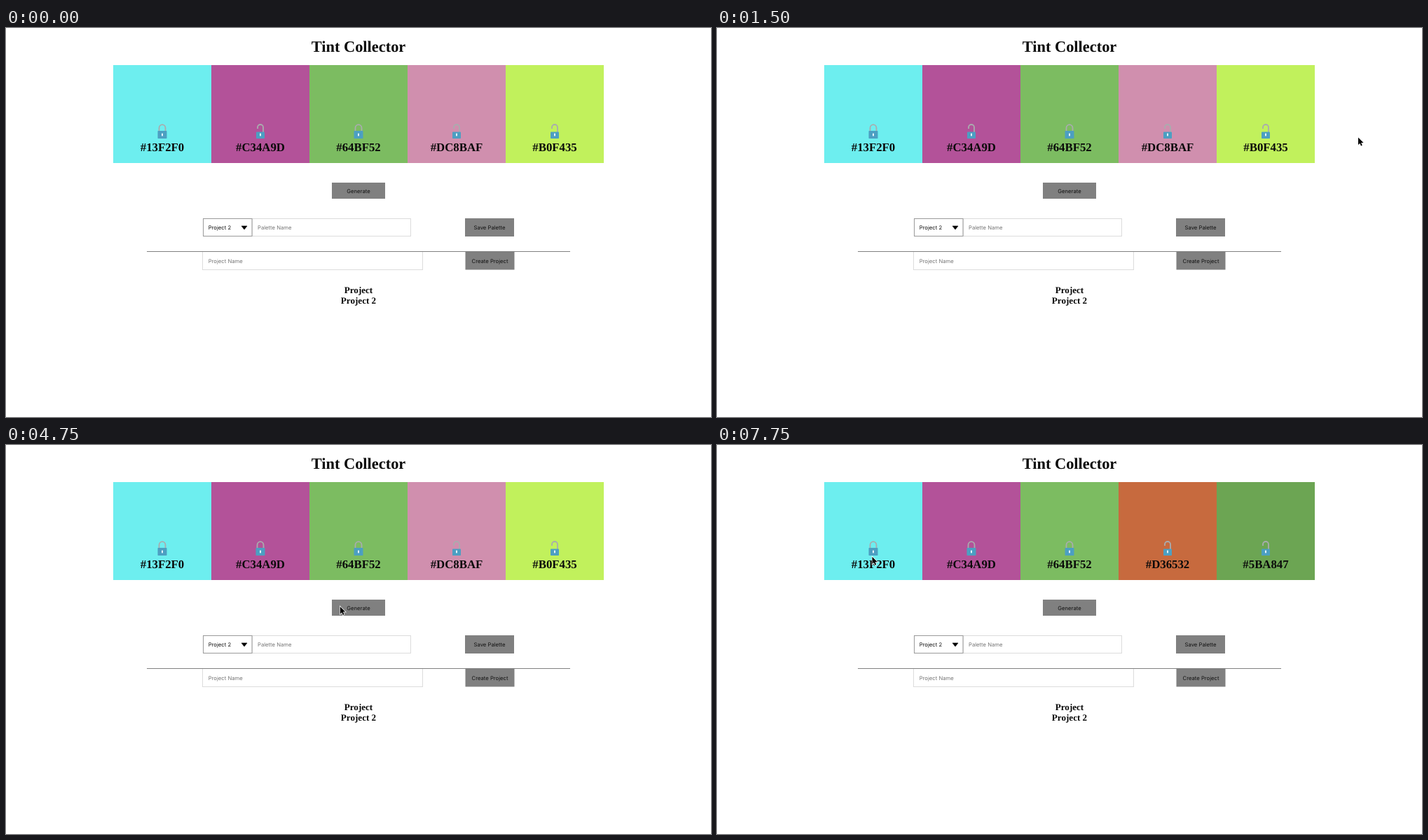
Write an HTML page that moves like this. It is 1006 by 556 pixels and loops after 8 s.

```html
<!DOCTYPE html>
<html lang="en">
<head>
<meta charset="utf-8">
<title>Tint Collector</title>
<style>
  html, body { margin: 0; width: 100%; height: 100%; overflow: hidden; background: #fff; }
  svg { display: block; }
  text { font: 7.7px Inter, "Open Sans", sans-serif; fill: #111; text-rendering: geometricPrecision; }
  .mid { text-anchor: middle; }
  .serif { font-family: "Liberation Serif", "Noto Serif", serif; font-weight: bold; fill: #0a0a0a; }
  .title { font-size: 22.4px; }
  .code { font-size: 16.8px; }
  .item { font-size: 13.1px; }
  .hint { fill: #757575; }
  .button { fill: #808080; }
  .field { fill: #fff; stroke: #dcdcdc; }
  .ring { fill: none; stroke: #619cf0; }
  .shackle { fill: none; stroke: #a9acae; stroke-width: 1.8; }
  .body { fill: #4c9fc2; }
  .keyhole { fill: #e8f6fc; }
</style>
</head>
<body>
<svg width="1006" height="556" viewBox="0 0 1006 556">
  <text class="serif title mid" x="503" y="33.5">Tint Collector</text>
  <g id="swatches"></g>

  <g id="focus">
    <rect class="ring" x="463.8" y="219.8" width="78.4" height="25.4" rx="1.5" stroke-width="3.6" opacity=".5"/>
    <rect class="ring" x="463.8" y="219.8" width="78.4" height="25.4" rx="1" stroke-width="2.2"/>
  </g>
  <rect class="button" x="465" y="221" width="76" height="23"/>
  <text class="mid" x="503" y="235.8">Generate</text>

  <rect class="field" x="351.5" y="272.5" width="226" height="25"/>
  <rect x="281.5" y="272.5" width="69.5" height="25" fill="#fff" stroke="#9a9a9a"/>
  <text x="288.7" y="288.2">Project 2</text>
  <path d="M336 283h8l-4 5z" stroke="#000" stroke-width=".6" stroke-linejoin="round"/>
  <text class="hint" x="359" y="288.2">Palette Name</text>
  <rect class="button" x="655" y="272" width="70" height="26"/>
  <text class="mid" x="690" y="288.2">Save Palette</text>

  <rect class="field" x="280.5" y="319.5" width="314" height="26"/>
  <text class="hint" x="288.7" y="335.8">Project Name</text>
  <rect class="button" x="655.5" y="319.5" width="70" height="26"/>
  <text class="mid" x="690.5" y="335.8">Create Project</text>
  <path d="M201 319.5H805" stroke="#808080"/>

  <text class="serif item mid" x="503" y="378.5">Project</text>
  <text class="serif item mid" x="503" y="394">Project 2</text>

  <g id="panel">
    <rect width="26" height="556" fill="#888"/>
    <path d="M9.2 268.5h10.6v20l-5.3-5-5.3 5z" fill="none" stroke="#fff" stroke-width="1.8"/>
  </g>
  <path id="cursor" d="M0 0V10.4L2.4 8.2 4 12 5.7 11.2 4.2 7.5H7.5Z" fill="#000"
        stroke="#fff" stroke-width="1.4" paint-order="stroke"/>
</svg>
<script>
const LOOP = 8000, TICK = 250;
const $ = id => document.getElementById(id);
const easeOut = p => 1 - (1 - Math.min(Math.max(p, 0), 1)) ** 3;

// The pointer glides to each stop and rests there until the next one.
const glides = [
  { at: 0, for: 250, x: 1002, y: 170.5 },
  { at: 500, for: 250, x: 924, y: 157 },
  { at: 1250, for: 250, x: 915, y: 156.5 },
  { at: 1500, for: 750, x: 289.5, y: 160 },
  { at: 2500, for: 250, x: 254.5, y: 155 },
  { at: 2750, for: 750, x: 363.5, y: 154.5 },
  { at: 4000, for: 750, x: 476.8, y: 231 },
  { at: 6750, for: 250, x: 466.5, y: 228.5 },
  { at: 7000, for: 350, x: 221.5, y: 159.7 }
];

function pointer(t) {
  let x = 1020, y = 170;
  for (const g of glides) {
    const p = easeOut((t - g.at) / g.for);
    x += (g.x - x) * p;
    y += (g.y - y) * p;
  }
  return [x, y];
}

// Locked swatches stay; each press of the button replaces the last two.
const kept = [["#13F2F0", "#6deeef"], ["#C34A9D", "#b35299"], ["#64BF52", "#7cbc61"]];
const drawn = [
  [["#DC8BAF", "#d08fae"], ["#B0F435", "#c1f15c"]],
  [["#4572BA", "#4b71b6"], ["#71B3B4", "#80b0b2"]],
  [["#D36532", "#c76a3e"], ["#5BA847", "#6ca553"]]
];
const presses = [5000, 6000];
const lockedAt = [0, 3750, 0];

function lock(x, closed) {
  const [shackle, half, top] = closed
    ? [`M${x - 4.5} 148v-5a4.5 4.8 0 0 1 9 0v5`, 6.5, 147]
    : [`M${x - 4} 144v-2a4 4 0 0 1 8 0v7`, 6, 148.4];
  return `<path class="shackle" d="${shackle}"/>
    <rect class="body" x="${x - half}" y="${top}" width="${2 * half}" height="${158 - top}" rx=".8"/>
    <rect class="keyhole" x="${x - 1}" y="150.5" width="2" height="4" rx=".7"/>`;
}

function swatch([code, color], i, closed) {
  const x = 153 + 140 * i, mid = x + 70;
  return `<rect x="${x}" y="53" width="140" height="140" fill="${color}"/>
    ${lock(mid, closed)}
    <text class="serif code mid" x="${mid}" y="176.4">${code}</text>`;
}

const move = (id, x, y = 0) => $(id).setAttribute("transform", `translate(${x} ${y})`);

let shown = "";
function draw() {
  const now = performance.now() % LOOP;
  const t = now - now % TICK;

  const round = presses.filter(at => at <= t).length;
  const html = [...kept, ...drawn[round]]
    .map((s, i) => swatch(s, i, t >= lockedAt[i])).join("");
  if (html !== shown) $("swatches").innerHTML = shown = html;

  $("focus").style.display = round && t < LOOP - TICK ? "" : "none";
  move("panel", t < 500 ? 1006 : 981 + 25 * easeOut((t - 500) / 500));
  move("cursor", ...pointer(t));
  requestAnimationFrame(draw);
}
draw();
</script>
</body>
</html>
```
